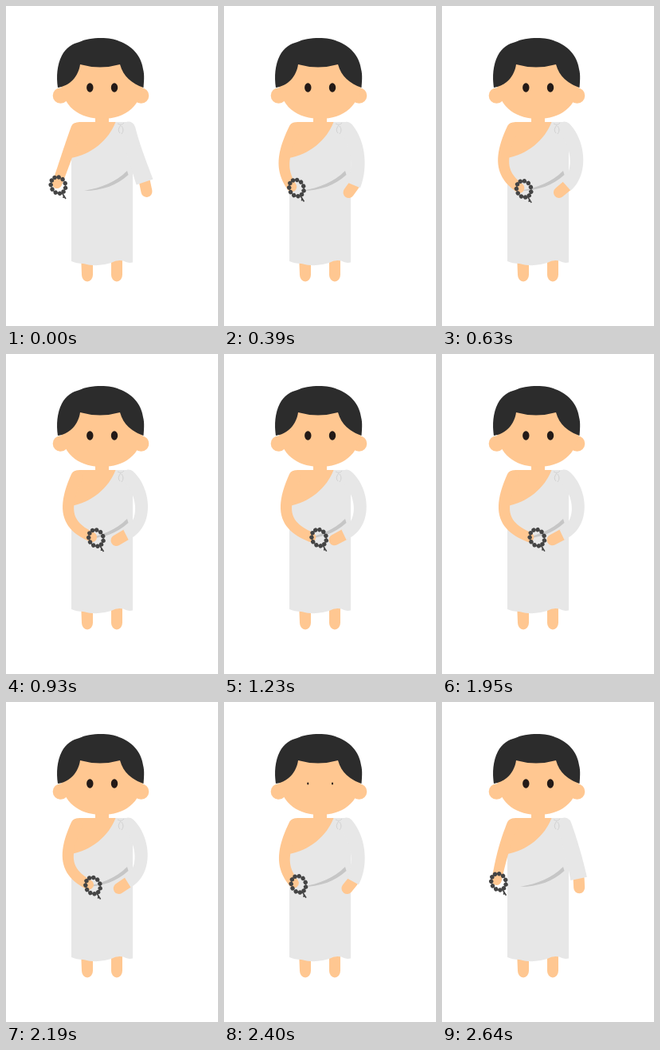
An HTML page that plays this animation: 266 px wide and 400 px high, repeating every 2.67 s.

```html
<!DOCTYPE html>
<html lang="en">
<head>
<meta charset="utf-8">
<title>Man with prayer beads</title>
<style>
  html, body { margin: 0; width: 100%; height: 100%; overflow: hidden; background: #fff; }
  svg { display: block; width: 100%; height: 100%; }
  .skin { fill: #ffc791; }
  .cloth { fill: #e7e7e7; }
  .dark { fill: #2c2c2c; }
</style>
</head>
<body>
<svg viewBox="0 0 266 400">
  <g class="skin">
    <path d="M94 310H109V336A7 8.500 0 0 1 95 336Z"/>
    <path d="M132 310H146V336A7 8.500 0 0 1 132 336Z"/>
    <path d="M112 132H129V145H150V195H83L82 156Q83 145 92 145H112Z"/>
    <circle cx="68.5" cy="112" r="9.8"/>
    <circle cx="169.5" cy="112" r="9.8"/>
    <path d="M68 88C68 128 94 141 121 141C149 141 173 125 173 88L145 66H92Z"/>
  </g>
  <path class="dark" d="M65 102C63 88 64 74 70 62C75 52 84 47 92 45C104 39 130 38 142 44C157 49 170 62 172 79C174 86 173 95 172.500 102C158 97 147 88 143 73Q118 80 93 73C91 88 80 100 65 102Z"/>
  <g id="eyes" fill="#231a17"></g>
  <path class="cloth" d="M137.500 145H154Q159 145 159 153V320.500Q153 322 147 318.500Q139 317 132 321Q114 327 97 322Q88 322 82 319V190C106 186 129 168 137.500 145Z"/>
  <path fill="#c6c6c6" d="M98 231C120 227 138 220 152 206L153.500 211C140 224 120 231 98 231Z"/>
  <path id="palm" fill="none" stroke="#ffc791" stroke-width="14" stroke-linecap="round"/>
  <path id="sleeve" class="cloth"/>
  <path d="M140 147Q145 150 148 146M144 149Q139 155 143 159M145 150Q149 155 145 160" fill="none" stroke="#d2d2d2" stroke-width="1"/>
  <path id="arm" class="skin"/>
  <g id="beads"></g>
</svg>
<script>
const LOOP = 2670, STEP = 30;
const $ = id => document.getElementById(id);

// time, bead position, speed
const track = [
  [0, 65.5, .08], [390, 91, .055], [930, 113, .026], [1560, 122.4, .004],
  [1950, 119.4, -.025], [2400, 93.5, -.088], [2640, 71, -.13], [LOOP, 65.5, -.19]
];

// arm and sleeve: two control points and the end; then cuff width, palm tip, ring centre
const poses = [
  { arm: [80, 176, 73, 198, 64, 222], sleeve: [158, 175, 166, 197, 174, 220], cuff: 22, tip: [176.5, 232], ring: [65.5, 224] },
  { arm: [70, 190, 73, 208, 85, 226], sleeve: [170, 173, 171, 204, 163, 224], cuff: 17, tip: [156.5, 233], ring: [91, 227.5] },
  { arm: [68, 198, 79, 216, 108, 229], sleeve: [172, 169, 180, 211, 150.5, 226], cuff: 14, tip: [138.5, 233], ring: [113, 230] },
  { arm: [68, 198, 78, 216, 110, 229], sleeve: [174, 169, 181, 212, 150.5, 226], cuff: 14, tip: [138.5, 232], ring: [122.4, 229.5] }
];

const mix = (a, b, k) => Array.isArray(a) ? a.map((v, i) => mix(v, b[i], k)) : a + (b - a) * k;

function beadX(t) {
  let i = 0;
  while (i < track.length - 2 && t >= track[i + 1][0]) i++;
  const [t0, a, va] = track[i], [t1, b, vb] = track[i + 1];
  const d = t1 - t0, u = (t - t0) / d, w = 1 - u;
  return a * w * w * (1 + 2 * u) + b * u * u * (3 - 2 * u) + d * u * w * (va * w - vb * u);
}

function poseAt(x) {
  let i = 0;
  while (i < poses.length - 2 && x > poses[i + 1].ring[0]) i++;
  const a = poses[i], b = poses[i + 1];
  const k = (x - a.ring[0]) / (b.ring[0] - a.ring[0]), out = {};
  for (const key in a) out[key] = mix(a[key], b[key], k);
  return out;
}

// Tapered band along a cubic curve, rounded at the start and optionally at the end
function band(x0, y0, [x1, y1, x2, y2, x3, y3], w0, w1, round) {
  const left = [], right = [], n = 24;
  for (let i = 0; i <= n; i++) {
    const t = i / n, s = 1 - t;
    const at = (a, b, c, d) => s * s * s * a + 3 * s * s * t * b + 3 * s * t * t * c + t * t * t * d;
    const slope = (a, b, c, d) => s * s * (b - a) + 2 * s * t * (c - b) + t * t * (d - c);
    const dx = slope(x0, x1, x2, x3), dy = slope(y0, y1, y2, y3);
    const r = mix(w0, w1, t) / 2 / Math.hypot(dx, dy);
    const x = at(x0, x1, x2, x3), y = at(y0, y1, y2, y3);
    left.push((x + dy * r).toFixed(2) + " " + (y - dx * r).toFixed(2));
    right.unshift((x - dy * r).toFixed(2) + " " + (y + dx * r).toFixed(2));
  }
  const arc = (w, p) => `A${w / 2} ${w / 2} 0 0 1 ${p}`;
  return "M" + left.join("L") + (round ? arc(w1, right[0]) : "L" + right[0]) +
    "L" + right.slice(1).join("L") + arc(w0, left[0]) + "Z";
}

function eyeSize(t) {
  const gap = Math.min(Math.abs(t - 200), Math.abs(t - 2400));
  return Math.min(1, Math.max(.25, gap / 150));
}

function drawBeads() {
  const count = 11;
  let s = '<g transform="rotate(-25)"><ellipse rx="9" ry="10.500" fill="none" stroke="#444"/>';
  for (let i = 0; i < count; i++) {
    const a = (i + .25) / count * Math.PI * 2;
    s += `<circle cx="${(9 * Math.cos(a)).toFixed(2)}" cy="${(10.5 * Math.sin(a)).toFixed(2)}" r="2.700" fill="#444"/>`;
  }
  s += '</g><path d="M5 10L9.500 17M7 12L6.500 16" fill="none" stroke="#444" stroke-width="1.600"/>';
  $("beads").innerHTML = s;
}

function draw(t) {
  const p = poseAt(beadX(t)), e = eyeSize(t);
  $("arm").setAttribute("d", band(89, 153, p.arm, 15, 12.5, true));
  $("sleeve").setAttribute("d", band(153.5, 153.5, p.sleeve, 18, p.cuff, false));
  $("palm").setAttribute("d", `M${p.sleeve.slice(4)}L${p.tip}`);
  $("beads").setAttribute("transform", `translate(${p.ring})`);
  $("eyes").innerHTML = [105.3, 136].map(x =>
    `<ellipse cx="${x}" cy="102" rx="${4.2 * e}" ry="${5.7 * e}"/>`).join("");
}

function tick(now) {
  draw(Math.floor(now % LOOP / STEP) * STEP);
  requestAnimationFrame(tick);
}

drawBeads();
draw(0);
requestAnimationFrame(tick);
</script>
</body>
</html>
```
